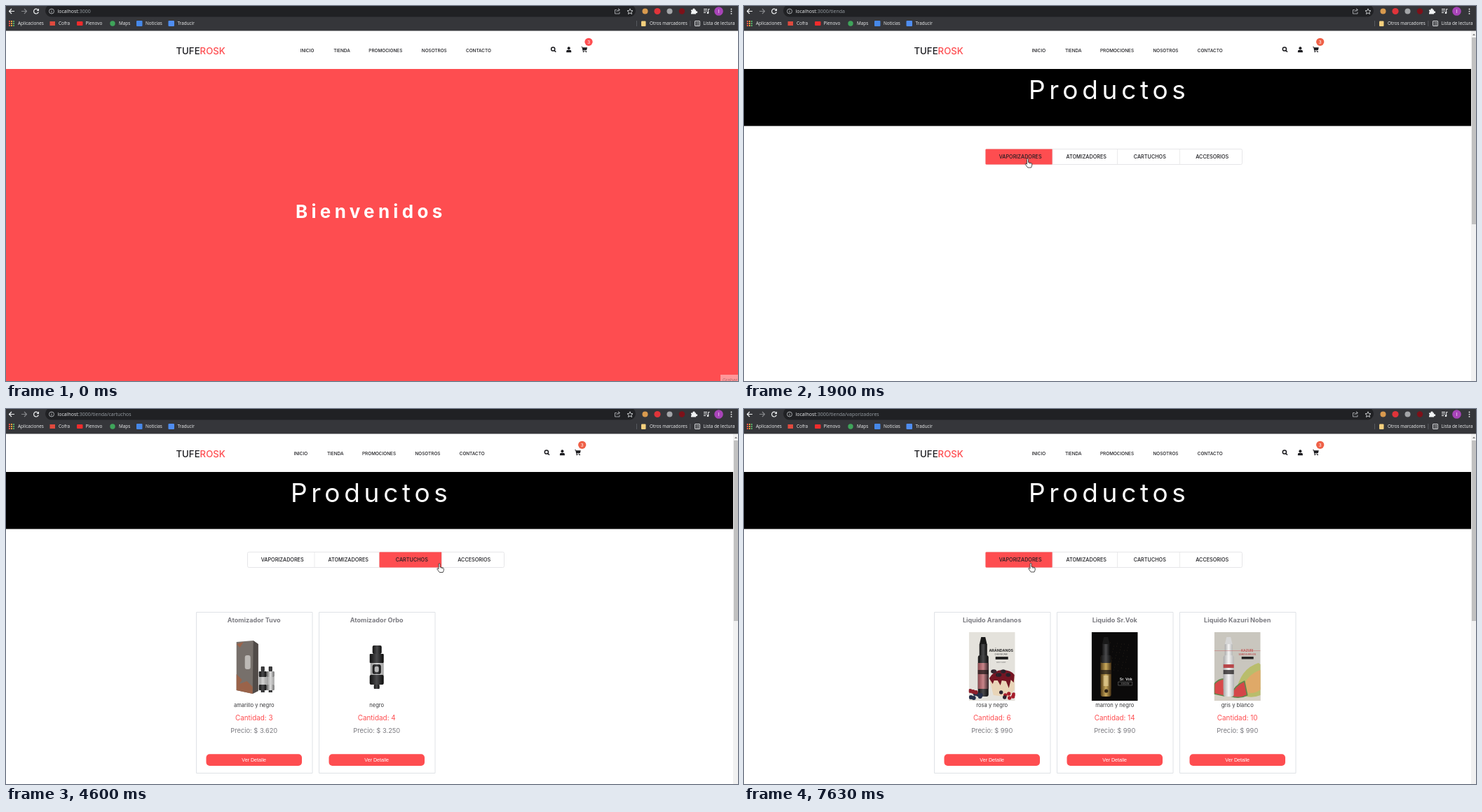
An HTML page with a canvas for the animation above (8000 ms loop, 1044x536 px).

```html
<!DOCTYPE html>
<html lang="es">
<head>
<meta charset="utf-8">
<style>
html, body { margin: 0; width: 100%; height: 100%; overflow: hidden; background: #fff; }
canvas { display: block; width: 1044px; height: 536px; }
</style>
</head>
<body>
<canvas id="stage"></canvas>
<script>
const W = 1044, H = 536, LOOP = 8000;
const canvas = document.getElementById('stage');
const ctx = canvas.getContext('2d');
const dpr = window.devicePixelRatio || 1;
canvas.width = W * dpr;
canvas.height = H * dpr;

const RED = '#fe4d50', INK = '#1b1b1f';
const UI = '"Open Sans", sans-serif', WEB = 'Inter, sans-serif', BTN = '"Liberation Sans", Arial, sans-serif';

// Drawing helpers
function rect(x, y, w, h, fill, r = 0) {
  ctx.fillStyle = fill;
  ctx.beginPath();
  ctx.roundRect(x, y, w, h, r);
  ctx.fill();
}
function frame(x, y, w, h, color, r = 0, lw = 1) {
  ctx.strokeStyle = color;
  ctx.lineWidth = lw;
  ctx.beginPath();
  ctx.roundRect(x, y, w, h, r);
  ctx.stroke();
}
function dot(x, y, r, fill) {
  ctx.fillStyle = fill;
  ctx.beginPath();
  ctx.arc(x, y, r, 0, 7);
  ctx.fill();
}
function shape(d, x, y, fill, stroke, lw = 1) {
  const p = new Path2D(d);
  ctx.save();
  ctx.translate(x, y);
  ctx.lineJoin = 'round';
  if (fill) { ctx.fillStyle = fill; ctx.fill(p); }
  if (stroke) { ctx.strokeStyle = stroke; ctx.lineWidth = lw; ctx.stroke(p); }
  ctx.restore();
}
function text(s, x, y, font, color, align = 'left', gap = 0) {
  ctx.font = font;
  ctx.fillStyle = color;
  ctx.textAlign = align;
  ctx.letterSpacing = gap + 'px';
  ctx.fillText(s, x, y);
  return x + ctx.measureText(s).width;
}
const TONES = {
  steel: ['#5d5d5d', '#e2e2e2', '#6a6a6a'],
  black: ['#121212', '#4b4b4d', '#0c0c0c'],
  clear: ['#999', '#d4d4d4', '#a2a2a2'],
  gold: ['#57401a', '#c9a95c', '#4b3516'],
  white: ['#a9a9a9', '#f6f6f6', '#b5b5b5'],
  wine: ['#8d4a50', '#c9868a', '#37262a']
};
function tube(x, y, w, h, tone, r = 0) {
  const g = ctx.createLinearGradient(x, 0, x + w, 0);
  TONES[tone].forEach((c, i) => g.addColorStop(i / 2, c));
  rect(x, y, w, h, g, r);
}

// Product pictures: origin at the top centre of a 66 x 98 area
function drawKit() {
  tube(-4, 12, 8, 6, 'black', 1);
  tube(-3, 18, 6, 4, 'steel');
  tube(-6, 22, 12, 6, 'steel', 1);
  tube(-6, 28, 12, 11, 'black');
  tube(-3, 29, 7, 8, 'clear');
  tube(-7, 39, 14, 13, 'steel', 1);
  dot(0, 46, 2, '#777');
  tube(-7, 53, 14, 4, 'black');
  tube(-8, 57, 15, 35, 'steel', 1);
}
function drawPod() {
  tube(-7, 22, 14, 14, 'clear', 2);
  shape('M-7 34H7Q13 37 13 43V68H-13V43Q-13 37-7 34Z', 0, 0, '#bababb', '#8c8c8c', .8);
  tube(-9, 36, 18, 5, 'black', 1);
  tube(-6, 41, 4, 7, 'black');
  tube(2, 41, 4, 7, 'black');
  tube(-10, 52, 20, 12, 'clear');
  tube(-13, 67, 26, 9, 'black', 1);
}
function drawSwag() {
  tube(-10, 7, 20, 15, 'black', 2);
  tube(-6, 22, 12, 4, 'steel');
  shape('M-17 29Q-17 26-12 26H12Q17 26 17 29V48H-17Z', 0, 0, '#19191a');
  tube(-17, 31, 34, 16, 'black');
  tube(-18, 48, 36, 29, 'clear');
  tube(-10, 49, 20, 27, 'black');
  tube(-18, 77, 36, 17, 'steel', 1);
  rect(-14, 84, 7, 4, '#333');
}
function drawVinci() {
  shape('M-7 22Q-7 19-4 19H5Q9 20 9 24L10 36Q16 38 16 43H-16Q-16 38-9 36Z', 0, 0, '#222224');
  tube(-16, 42, 32, 7, 'black');
  tube(-16, 49, 32, 13, 'gold');
  tube(-5, 50, 10, 12, 'white');
  tube(-16, 61, 32, 12, 'black', 1);
  tube(-8, 73, 16, 6, 'steel', 1);
}
function drawMelo() {
  shape('M-25 14L-1 12L6 17V84L-2 88L-25 83Z', 0, 0, '#77706b');
  shape('M-1 12L6 17V84L-2 88Z', 0, 0, '#514b48');
  shape('M-25 60L-17 68L-21 74L-10 70L-2 78V88L-25 83ZM-25 17L-15 14L-20 22Z', 0, 0, '#9a634a');
  rect(-13, 33, 8, 20, '#bdb9b5', 3);
  for (const [x, tone] of [[7, 'black'], [18, 'steel']]) {
    tube(x + 3, 49, 5, 7, 'black', 1);
    tube(x, 56, 11, 8, tone, 1);
    tube(x, 64, 11, 11, 'clear');
    tube(x, 75, 11, 8, tone, 1);
    tube(x + 3, 83, 5, 3, 'black');
  }
}
function drawZeus() {
  tube(-6, 19, 13, 12, 'black', 2);
  tube(-10, 31, 20, 13, 'black', 1);
  tube(-9, 44, 19, 18, 'clear');
  tube(-6, 46, 12, 14, 'black', 3);
  rect(-3, 49, 6, 8, '#b9b9b9', 2);
  tube(-10, 61, 20, 14, 'black', 2);
  tube(-4, 75, 8, 6, 'black', 1);
}
function bottle(cap, body, label) {
  shape('M-18 18L-15.5 7H-9.5L-7 18Z', 0, 0, cap === 'white' ? '#d6d6d6' : '#191919');
  tube(-18, 17, 11, 17, cap, 1);
  tube(-20, 33, 15, 59, body, 3);
  tube(-20, 44, 15, 37, label);
  rect(-20, 54, 15, 6, 'rgba(25,20,20,.7)');
}
function drawBerry() {
  rect(-33, 0, 66, 98, '#e4e2dc');
  bottle('black', 'black', 'wine');
  shape('M-4 66L14 56L32 63V82L24 93L2 90Z', 0, 0, '#e9d5b8');
  shape('M-4 66Q3 54 15 54T32 61L31 72L27 68L24 80L20 70L14 69L12 76L8 69L3 69L1 74Z', 0, 0, '#751523');
  for (let i = 0; i < 14; i++) dot(1 + (i * 7) % 27, 56 + (i * 5) % 10, 2.6, i % 3 ? '#262029' : '#3a2530');
  for (let i = 0; i < 9; i++) dot(-31 + (i * 7) % 17, 84 + (i * 4) % 11, 3, i % 3 ? '#27304a' : '#8e1f2c');
  for (let i = 0; i < 7; i++) dot(13 + (i * 6) % 19, 86 + (i * 4) % 9, 2.7, i % 4 ? '#a51d2b' : '#2c2230');
  text('ARÁNDANOS', 13, 28, '700 5.3px ' + WEB, '#292929', 'center');
  text('CHEESECAKE', 13, 32.5, '500 2.8px ' + WEB, '#555', 'center');
  rect(5, 35, 18, 4, '#242424');
  text('sabor suave', 13, 44, '2.3px ' + WEB, '#777', 'center');
}
function drawDark() {
  rect(-33, 0, 66, 98, '#0b0a0a');
  for (let i = 0; i < 55; i++) dot(-16 + (i * 13) % 37, 14 + (i * 23) % 43, .35, '#725938');
  bottle('black', 'gold', 'gold');
  tube(-20, 33, 15, 11, 'black', 2);
  rect(-16, 62, 7, 15, 'rgba(235,215,160,.6)');
  dot(-12, 84, 2.6, '#2c2014');
  text('Sr. Vok', 16, 69, '600 5.3px ' + WEB, '#eee', 'center');
  frame(5, 71, 20, 5, '#888', 0, .5);
  text('EDICION', 15, 74.8, '2.8px ' + WEB, '#aaa', 'center');
}
function drawMelon() {
  rect(-33, 0, 66, 98, '#c9c6be');
  rect(-33, 78, 66, 20, '#d5d0c5');
  shape('M-2 86Q4 52 30 44L33 46V90Q16 97-2 86Z', 0, 0, '#b9bd6c');
  shape('M6 82Q14 60 33 54V82Q20 92 6 82Z', 0, 0, '#dfa968');
  shape('M-33 74Q-24 64-14 68L-19 91L-33 88Z', 0, 0, '#d8494a', '#60864c', 1.6);
  shape('M-10 91Q-4 76 10 70L14 90Q2 96-10 91Z', 0, 0, '#d44648', '#60864c', 1.6);
  bottle('white', 'white', 'white');
  rect(-20, 46, 15, 5, '#b8474a');
  text('KAZURI', 14, 28, '600 4.6px ' + WEB, '#c34b4b', 'center');
  text('SANDIA MELON', 14, 33, '600 3.2px ' + WEB, '#b55', 'center');
  rect(-33, 26.5, 66, .5, '#c86b68');
  rect(6, 35, 17, 3.5, '#262626');
}

const kit = ['Kit Nubarello Lar Tino Doble', 'gris', 2, '8.157', drawKit];
const berry = ['Liquido Arandanos', 'rosa y negro', 6, '990', drawBerry];
const pod = ['Cartucho Kelubo Trq', 'transparente', 8, '1.800', drawPod];
const tuvo = ['Atomizador Tuvo', 'amarillo y negro', 3, '3.620', drawMelo];
const orbo = ['Atomizador Orbo', 'negro', 4, '3.250', drawZeus];
const brim = ['Cartucho Nubarello Brim', 'gris plata', 22, '2.500', drawSwag];
const darni = ['Cartucho Kelubo Darni', 'amarillo y negro', 10, '990', drawVinci];
const vok = ['Liquido Sr.Vok', 'marron y negro', 14, '990', drawDark];
const kazuri = ['Liquido Kazuri Noben', 'gris y blanco', 10, '990', drawMelon];

// Timeline
const SHOP_AT = 1120;
const urls = [[0, ''], [SHOP_AT, 'tienda'], [2960, 'tienda/vaporizadores'], [3290, 'tienda/atomizadores'],
  [4540, 'tienda/cartuchos'], [5850, 'tienda/accesorios'], [7170, 'tienda/vaporizadores']];
const lists = [[0, [], 312], [2100, [kit, berry, pod], 247], [3160, [kit], 303], [3680, [tuvo, orbo], 303],
  [5260, [pod, brim, darni], 303], [6580, [berry, vok, kazuri], 303]];
const clicks = [[1000, SHOP_AT], [2900, 2960], [3220, 3290], [4410, 4540], [5720, 5850], [7100, 7170]];
const path = [[70, 1032, 528], [270, 643, 255], [470, 643, 255], [980, 474, 62], [1310, 474, 62],
  [1680, 416, 227], [1900, 404.5, 218.5], [2890, 404.5, 218.5], [3190, 485, 220], [3550, 485, 220],
  [4000, 585, 220], [4210, 600, 221], [4430, 600, 221], [4600, 618, 221], [5000, 667, 221],
  [5190, 667, 221], [5500, 666, 217], [5850, 666, 217], [6180, 507, 222.5], [6510, 399.5, 214],
  [7370, 399.5, 214], [7630, 409, 220.5]];

const latest = (list, t) => list.filter(e => e[0] <= t).pop();
function cursorAt(t) {
  const i = path.findIndex(k => k[0] > t);
  if (i < 0) return path[path.length - 1].slice(1);
  const [t0, x0, y0] = path[i - 1], [t1, x1, y1] = path[i];
  const k = (t - t0) / (t1 - t0);
  return [x0 + (x1 - x0) * k, y0 + (y1 - y0) * k];
}

function drawBrowser(url) {
  rect(0, 0, W, 35.5, '#35363a');
  rect(56, -2, 842, 17.5, '#202124', 8.7);
  shape('M4 0H-3.5M0-3.5L-3.5 0L0 3.5', 8, 7.5, null, '#f1f3f4', 1.2);
  shape('M-4 0H3.5M0-3.5L3.5 0L0 3.5', 26, 7.5, null, '#85878a', 1.2);
  shape('M2.7-2A3.4 3.4 0 1 0 3.3 1', 43, 7.5, null, '#f1f3f4', 1.2);
  shape('M4-4V-.5H.5Z', 43, 7.5, '#f1f3f4');
  shape('M3.5 0A3.5 3.5 0 1 1-3.5 0A3.5 3.5 0 1 1 3.5 0M0-.6V2M0-2V-1.2', 65, 7.5, null, '#b5b8bc', .9);
  const end = text('localhost', 73.5, 10.2, '7px ' + UI, '#eceef0');
  text(':3000/'.slice(0, url ? 6 : 5) + url, end, 10.2, '7px ' + UI, '#9aa0a6');
  shape('M-1-2H-3.5V3.5H3V1M-1 1Q-1-2 3-2M1-4L3.5-2L1 0', 872, 7.5, null, '#bfc2c6', .8);
  shape('M0-4L1.1-1.3L4-1L1.8.9L2.5 3.7L0 2.2L-2.5 3.7L-1.8.9L-4-1L-1.1-1.3Z', 890, 7.8, null, '#d4d6d9', .9);
  dot(911.5, 7.5, 4, '#d99a4e');
  dot(929, 7.5, 4.6, '#e0343a');
  dot(946.5, 7.5, 4, '#a3a5a8');
  dot(964, 7.5, 4.2, '#7d1119');
  shape('M-4-2H-1.4A1.5 1.5 0 1 1 1.4-2H3V0A1.5 1.5 0 1 1 3 2.6V4H-4V2A1.4 1.4 0 0 0-4-.5Z', 981, 7.5, '#f1f3f4');
  shape('M-4-3H1M-4-.5H1M-4 2H-1M2.7 2V-3H4.5', 999, 7.5, null, '#f1f3f4', 1);
  dot(1001, 9.8, 1.4, '#f1f3f4');
  dot(1016.5, 7.5, 6.3, '#a844b8');
  text('I', 1016.5, 10, '7px ' + UI, '#fff', 'center');
  for (const y of [4.5, 7.7, 10.9]) dot(1034.5, y, .9, '#f1f3f4');

  const label = (s, x) => text(s, x, 27.4, '6.4px ' + UI, '#f0f1f2');
  const hues = ['#ea5548', '#f0a43a', '#56a866', '#5b91e8'];
  for (let i = 0; i < 9; i++) rect(4 + i % 3 * 3, 21 + (i / 3 | 0) * 3, 2, 2, hues[(i + (i / 3 | 0)) % 4]);
  rect(62.5, 22, 7.5, 6, '#df4a3e');
  rect(101, 22, 8.5, 6, '#f02c2c', 1);
  dot(152, 25, 3.7, '#3fa45a');
  rect(186, 21, 8.5, 8, '#4688e8', 1);
  rect(231.5, 21, 8.5, 8, '#4f8df0', 1);
  [['Aplicaciones', 17], ['Cofra', 75], ['Plenovo', 113.5], ['Maps', 161], ['Noticias', 199],
    ['Traducir', 244.5], ['Otros marcadores', 918], ['Lista de lectura', 994.5]].forEach(a => label(...a));
  rect(899, 21, .8, 8, '#606368');
  rect(975.5, 21, .8, 8, '#606368');
  rect(906, 21.5, 6.5, 7.5, '#f4cf7d', 1);
  frame(982.5, 21.5, 7, 7, '#e4e6e8', .5, .9);
  shape('M-2-1.5H-1M0-1.5H2M-2 .2H-1M0 .2H2M-2 2H-1M0 2H2', 986, 25, null, '#e4e6e8', .8);
}

function drawHeader(shop, hover) {
  const dx = shop ? -9.3 : 0;
  const end = text('TUFE', 242.5, 68.8, '500 13.2px ' + WEB, INK);
  text('ROSK', end, 68.8, '500 13.2px ' + WEB, RED);
  [['INICIO', 419.7], ['TIENDA', 467.2], ['PROMOCIONES', 517.3], ['NOSOTROS', 592.8], ['CONTACTO', 656]]
    .forEach(([s, x]) => text(s, x + dx, 66.4, '500 6.4px ' + WEB, hover && s === 'TIENDA' ? '#b5b5b5' : INK));
  shape('M2.5 0A2.6 2.6 0 1 1-2.7 0A2.6 2.6 0 1 1 2.5 0M1.7 2L4 4.3', 780.3 + dx, 61.5, null, INK, 1.5);
  dot(802.7 + dx, 60.2, 2, INK);
  shape('M-3.5 4V2.5Q-3.5.5-1.5.5H1.5Q3.5.5 3.5 2.5V4Z', 802.7 + dx, 62.2, INK);
  shape('M-4.2-3.6H-2.5L-2.2-2.6H4.4L3.4 1.2H-1.3L-1.1 2H3V2.8H-2L-3.2-2.7H-4.2Z', 824.7 + dx, 61.8, INK);
  dot(823.6 + dx, 65.3, .9, INK);
  dot(827.4 + dx, 65.3, .9, INK);
  dot(831 + dx, 51.3, 5.6, shop ? '#ef6047' : RED);
  text('3', 831 + dx, 53.8, '6.8px ' + WEB, '#fff', 'center');
}

function drawHome(t) {
  rect(0, 90, W, 446, RED);
  text('Bienvenidos', 413, 303, '700 26px ' + WEB, '#fff', 'left', 5.3);
  ctx.globalAlpha = t < 70 ? 1 : Math.max(0, 1 - (t - 70) / 200);
  rect(1019, 527, 25, 9, 'rgba(255,255,255,.42)');
  text('Grabar', 1022, 536.5, '6.6px ' + UI, '#b5666a');
  ctx.globalAlpha = 1;
}

const tabs = [['VAPORIZADORES', 344.5, 440, 363.7], ['ATOMIZADORES', 440, 532.5, 459.5],
  ['CARTUCHOS', 532.5, 621.5, 555.8], ['ACCESORIOS', 621.5, 710.5, 644.2]];
const tabHit = ([, l, r], x, y) => x >= l && x < r && y > 204 && y < 227;

function drawCard([name, color, count, price, picture], i) {
  const x = 271 + i * 175, cx = x + 82.7;
  frame(x + .5, 290.5, 165.5, 230, '#dfe2e6');
  text(name, cx, 305, '700 9.1px ' + WEB, '#7c7c82', 'center');
  ctx.save();
  ctx.translate(cx, 319);
  ctx.beginPath();
  ctx.rect(-33, 0, 66, 98);
  ctx.clip();
  picture();
  ctx.restore();
  text(color, cx, 426, '400 7.6px ' + WEB, '#3a3a3d', 'center');
  text('Cantidad: ' + count, cx, 445.3, '400 9.9px ' + WEB, RED, 'center');
  text('Precio: $ ' + price, cx, 463, '400 9.3px ' + WEB, '#7b7b80', 'center');
  rect(x + 14.5, 493.3, 136.5, 16.6, RED, 5);
  text('Ver Detalle', cx, 504.2, '7.1px ' + BTN, '#fff', 'center');
}

function drawShop(t, x, y) {
  const [, cards, thumb] = latest(lists, t);
  rect(0, 90, 1037, 81.5, '#000');
  text('Productos', 406, 133, '400 37px ' + WEB, '#fff', 'left', 5.7);
  frame(344.5, 204.5, 366, 22, '#e6e6e8', 2);
  tabs.forEach((tab, i) => {
    const [s, l, r, tx] = tab;
    if (i) rect(l - .4, 204.5, .8, 22, '#e6e6e8');
    if (tabHit(tab, x, y)) rect(l, 204.5, r - l, 22, RED, 1);
    text(s, tx, 218, '500 7.25px ' + WEB, INK);
  });
  cards.forEach(drawCard);
  if (thumb === 247) for (let i = 0; i < 3; i++) frame(271.5 + i * 175, 530.5, 165.5, 20, '#dfe2e6');
  rect(1037, 35.5, 7, 501, '#f1f1f1');
  rect(1038, 45, 6, thumb - 45, '#c1c1c1');
  shape('M-2 1L0-1.2L2 1Z', 1041, 41, '#7a7a7a');
}

function drawCursor(t, x, y, hand) {
  if (clicks.some(([a, b]) => t >= a && t < b)) dot(x - .5, y - .5, 6.7, 'rgba(255,238,40,.75)');
  if (hand) {
    shape('M-1 .8Q-1-.3 0-.3T1 .8V5L5.2 6Q6.2 6.4 6.2 7.4V9.6L5 12.5H.2L-3 8.2Q-3.6 7-2.6 6.6L-1 7.7Z', x, y, '#fff', '#222', .8);
    shape('M2.6 5.5V7.4M4.4 6V7.6', x, y, null, '#222', .5);
  } else {
    shape('M0 0V9L2 7.1L3.4 10.2L4.8 9.5L3.4 6.5H6.3Z', x, y, '#fff', '#222', .7);
  }
}

function draw(t) {
  ctx.setTransform(dpr, 0, 0, dpr, 0, 0);
  rect(0, 0, W, H, '#fff');
  const shop = t >= SHOP_AT, [x, y] = t < 70 ? [-50, -50] : cursorAt(t);
  const onLink = x > 456 && x < 492 && y > 56 && y < 72;
  if (shop) drawShop(t, x, y); else drawHome(t);
  drawHeader(shop, onLink && (!shop || t > 1190));
  drawBrowser(latest(urls, t)[1]);
  if (t >= 70) drawCursor(t, x, y, onLink || shop && tabs.some(tab => tabHit(tab, x, y)));
}

const start = performance.now();
function tick() {
  draw((performance.now() - start) % LOOP);
  requestAnimationFrame(tick);
}
tick();
</script>
</body>
</html>
```
